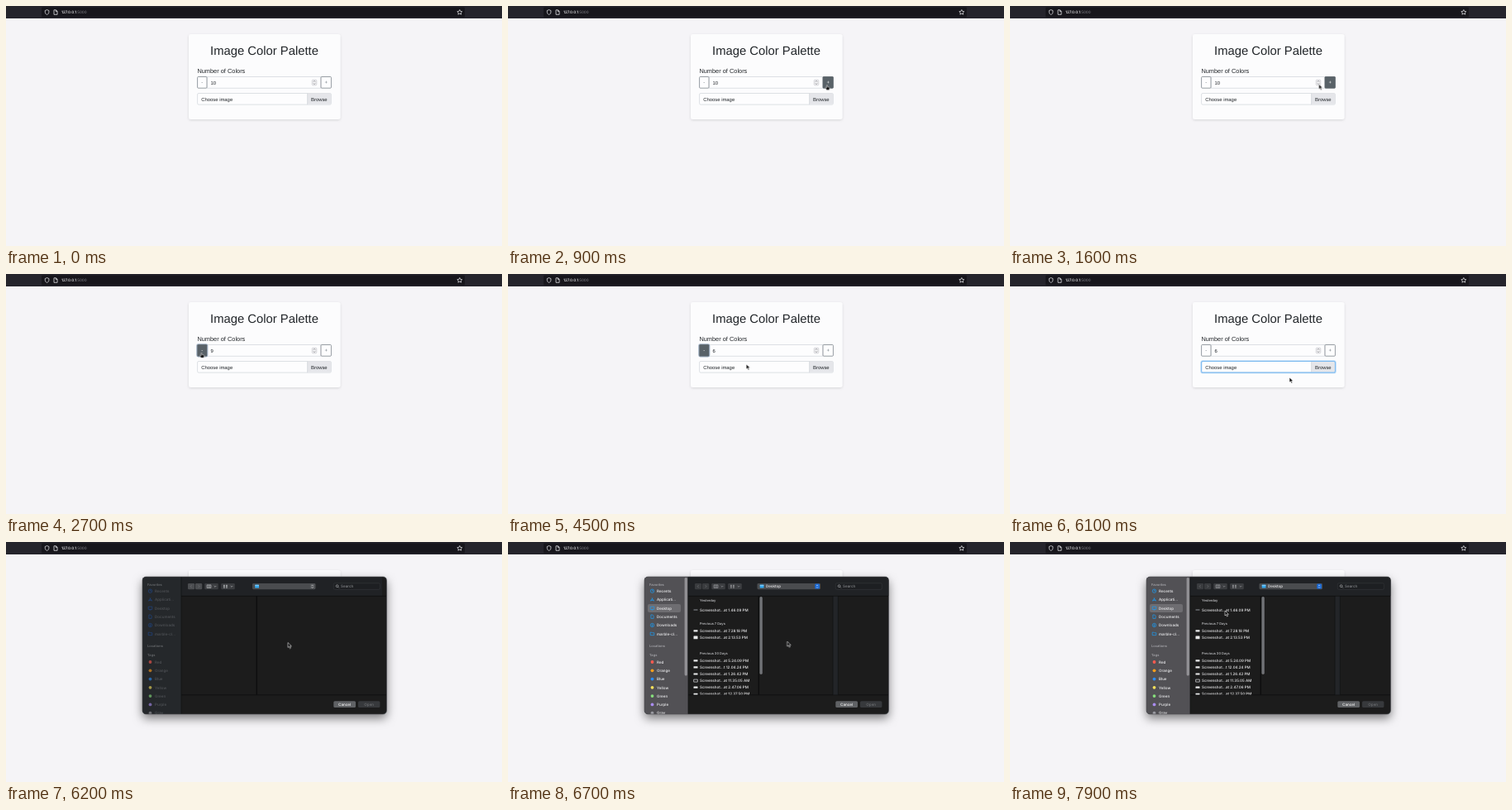
An HTML page for the animation above (8 s loop, 600 px wide and 290 px high).

```html
<!DOCTYPE html>
<html lang="en">
<head>
<meta charset="utf-8">
<title>Image Color Palette</title>
<style>
html, body { margin: 0; width: 100%; height: 100%; overflow: hidden; background: #f5f4f7; }
svg { display: block; width: 600px; height: 290px; }
text { text-rendering: geometricPrecision; }
.page text { font: 5.9px "Liberation Sans", Arial, sans-serif; fill: #212529; }
.page .title { font-size: 14.8px; }
.page .label { font-size: 7.4px; }
.page .light { fill: #fff; }
.ui { font: 500 4.55px Inter, sans-serif; }
.head { font: 600 4px Inter, sans-serif; }
.mid { text-anchor: middle; }

/* Hard switches share one 8 s clock */
.sw { animation: 8s step-end infinite; }
.plus { animation-name: plus; }
.minus { animation-name: minus; }
.minusRing { animation-name: minusRing; }
.fileRing { animation-name: fileRing; }
.n10 { animation-name: n10; }
.n9 { animation-name: n9; }
.n8 { animation-name: n8; }
.n7 { animation-name: n7; }
.n6 { animation-name: n6; }
.opening { animation-name: opening; }
.opened { animation-name: opened; }
.arrow { animation-name: arrow; }
.hand { animation-name: hand; }
.cursor { animation: move 8s linear infinite; }

@keyframes plus { 0% { opacity: 0 } 11.25% { opacity: 1 } 21.25% { opacity: 0 } }
@keyframes minus { 0% { opacity: 0 } 27.5% { opacity: 1 } 57.5% { opacity: 0 } }
@keyframes minusRing { 0% { opacity: 0 } 30% { opacity: 1 } 65% { opacity: 0 } }
@keyframes fileRing { 0% { opacity: 0 } 65% { opacity: .5 } 66.25% { opacity: 1 } }
@keyframes n10 { 0% { opacity: 1 } 30% { opacity: 0 } }
@keyframes n9 { 0% { opacity: 0 } 30% { opacity: 1 } 36.25% { opacity: 0 } }
@keyframes n8 { 0% { opacity: 0 } 36.25% { opacity: 1 } 38.75% { opacity: 0 } }
@keyframes n7 { 0% { opacity: 0 } 38.75% { opacity: 1 } 43.75% { opacity: 0 } }
@keyframes n6 { 0% { opacity: 0 } 43.75% { opacity: 1 } }
@keyframes opening { 0% { opacity: 0 } 77.5% { opacity: 1 } 78.75% { opacity: 0 } }
@keyframes opened { 0% { opacity: 0 } 78.75% { opacity: 1 } }
@keyframes arrow { 0% { opacity: 0 } 2.5% { opacity: 1 } 11.25% { opacity: 0 } 20% { opacity: 1 } 27.5% { opacity: 0 } 56.25% { opacity: 1 } }
@keyframes hand { 0% { opacity: 0 } 11.25% { opacity: 1 } 20% { opacity: 0 } 27.5% { opacity: 1 } 56.25% { opacity: 0 } }
@keyframes move {
  0%, 2.5% { transform: translate(345px, 218px); animation-timing-function: ease-out }
  12.5% { transform: translate(387px, 92px) }
  18.75% { transform: translate(386px, 93px) }
  20% { transform: translate(374px, 94.5px); animation-timing-function: ease-out }
  27.5%, 55% { transform: translate(236.5px, 95px) }
  56.25% { transform: translate(288px, 109px); animation-timing-function: ease-out }
  60%, 71.25% { transform: translate(337px, 111px) }
  76.25% { transform: translate(338px, 125px) }
  77.5%, 82.5% { transform: translate(341px, 121.5px); animation-timing-function: ease-in-out }
  91.25% { transform: translate(262px, 89px) }
  93.75%, 100% { transform: translate(260px, 83px) }
}
</style>
</head>
<body>
<svg viewBox="0 0 600 290">
  <defs>
    <filter id="cardShadow" x="-10%" y="-10%" width="120%" height="125%">
      <feDropShadow dx="0" dy="1" stdDeviation="1.6" flood-opacity=".13"/>
    </filter>
    <filter id="deepShadow" x="-15%" y="-15%" width="130%" height="140%">
      <feDropShadow dx="0" dy="5" stdDeviation="6" flood-opacity=".5"/>
    </filter>
    <clipPath id="frame"><rect x="165" y="42" width="295.5" height="166" rx="4.5"/></clipPath>
    <clipPath id="files"><rect x="218" y="66" width="86" height="118.5"/></clipPath>
  </defs>

  <rect width="600" height="290" fill="#f5f4f7"/>
  <rect width="600" height="15" fill="#25242c"/>
  <rect x="43" y="1.5" width="512" height="12" rx="1.5" fill="#17161c"/>
  <g fill="none" stroke="#dcdce0" stroke-width=".8" stroke-linejoin="round">
    <path d="M49.6 4.6l2.3.9v1.7c0 1.6-.9 2.6-2.3 3.3-1.4-.7-2.3-1.7-2.3-3.3V5.5z"/>
    <path d="M58 4.8h2.5l1.6 1.6v3.9H58zM60.4 4.9v1.7h1.6"/>
    <path d="M548.8 4.5l.9 1.9 2.1.3-1.5 1.4.4 2.1-1.9-1-1.9 1 .4-2.1-1.5-1.4 2.1-.3z"/>
  </g>
  <text class="ui" x="67" y="9.3" fill="#f5f5f7" style="font-size:4.6px">127.0.0.1<tspan fill="#85848c" font-weight="400">:5000</tspan></text>

  <g class="page">
    <rect x="221" y="34" width="183.5" height="103" rx="3" fill="#fcfcfd" filter="url(#cardShadow)"/>
    <text class="title mid" x="312.5" y="59">Image Color Palette</text>
    <text class="label" x="231.4" y="80.5">Number of Colors</text>

    <g fill="#fdfdfe" stroke-width=".7">
      <rect x="243" y="85.5" width="138" height="13.7" stroke="#d0d5da"/>
      <rect x="231.6" y="85.5" width="11.4" height="13.7" rx="1" stroke="#6c757d"/>
      <rect x="381" y="85.5" width="12.4" height="13.7" rx="1" stroke="#6c757d"/>
    </g>
    <text class="mid" x="237.3" y="94.3" style="fill:#6c757d">-</text>
    <text class="mid" x="387.2" y="94.4" style="fill:#6c757d">+</text>
    <g class="sw plus">
      <rect x="380.8" y="85.2" width="12.8" height="14.2" rx="1" fill="#596268"/>
      <text class="mid light" x="387.2" y="94.4">+</text>
    </g>
    <rect class="sw minusRing" x="230.9" y="84.8" width="12.8" height="15" rx="1.8" fill="none" stroke="#9fb0c4" stroke-width="1.3"/>
    <g class="sw minus">
      <rect x="231.4" y="85.2" width="11.8" height="14.2" rx="1" fill="#596268"/>
      <text class="mid light" x="237.3" y="94.3">-</text>
    </g>

    <text class="sw n10" x="247.5" y="94.5">10</text>
    <text class="sw n9" x="247.5" y="94.5">9</text>
    <text class="sw n8" x="247.5" y="94.5">8</text>
    <text class="sw n7" x="247.5" y="94.5">7</text>
    <text class="sw n6" x="247.5" y="94.5">6</text>

    <rect x="370.2" y="89.2" width="5.6" height="6.6" rx="1.2" fill="#f1f1f3" stroke="#b9b9be" stroke-width=".5"/>
    <path d="M371.8 91.6l1.2-1.2 1.2 1.2M371.8 93.4l1.2 1.2 1.2-1.2" fill="none" stroke="#55555a" stroke-width=".6"/>

    <rect x="231.6" y="105.5" width="161.8" height="13.6" rx="1.5" fill="#fdfdfe" stroke="#d0d5da" stroke-width=".7"/>
    <path d="M364.6 105.8h27.4q1.2 0 1.2 1.2v10.6q0 1.2-1.2 1.2h-27.4z" fill="#e5e6ea"/>
    <path d="M364.6 105.5v13.6" stroke="#d0d5da" stroke-width=".7"/>
    <text x="236.2" y="114.5">Choose image</text>
    <text x="369" y="114.5">Browse</text>
    <g class="sw fileRing" fill="none">
      <rect x="231.3" y="105.2" width="162.5" height="14.2" rx="2" stroke="#b9d9f7" stroke-width="1.8"/>
      <rect x="231.6" y="105.5" width="161.8" height="13.6" rx="1.5" stroke="#6db1ee" stroke-width=".8"/>
    </g>
  </g>

  <g class="sw opening" id="opening"></g>
  <g class="sw opened" id="opened"></g>

  <g class="cursor">
    <path class="sw arrow" d="M0 0v6l1.4-1.3 1 2.3 1.1-.5-1-2.2h1.9z" fill="#0b0b0c" stroke="#fff" stroke-width=".55" stroke-linejoin="round"/>
    <path class="sw hand" d="M-.6.5q.6-1 1.2 0v2l2 .5q.7.3.6 1L2.700 6.300h-3.200L-2.200 3.800q0-.8.800-.6l.800.700z" fill="#0b0b0c" stroke="#fff" stroke-width=".5" stroke-linejoin="round"/>
  </g>
</svg>

<script>
const rect = (x, y, w, h, fill, r = 0) =>
  `<rect x="${x}" y="${y}" width="${w}" height="${h}" rx="${r}" fill="${fill}"/>`;
const text = (x, y, str, fill, cls = 'ui') =>
  `<text class="${cls}" x="${x}" y="${y}" fill="${fill}">${str}</text>`;
const line = (d, color, w = .6) =>
  `<path d="${d}" fill="none" stroke="${color}" stroke-width="${w}"/>`;

const places = [
  ['Recents', 'M2.200 0a2.200 2.200 0 1 0-4.400 0a2.200 2.200 0 1 0 4.400 0M0-1.400V0h1.200'],
  ['Applicati…', 'M-1.800 2L.500-2M1.800 2L-.500-2M-2.200.800h4.400'],
  ['Desktop', 'M-2.300-1.700h4.600v3.200h-4.600zM-1 2.200h2'],
  ['Documents', 'M-1.600-2.200h2l1.200 1.200v3.200h-3.200z'],
  ['Downloads', 'M2.200 0a2.200 2.200 0 1 0-4.400 0a2.200 2.200 0 1 0 4.400 0M0-1.200V1M-.900.200L0 1.100.900.200'],
  ['marble-cl…', 'M-2.300-1.700h1.700l.600.600h2.300v2.900h-4.600z']
];
const tags = [
  ['Red', '#ff5a50'], ['Orange', '#ff9f1c'], ['Blue', '#2a8cf5'], ['Yellow', '#f5e05a'],
  ['Green', '#86e07c'], ['Purple', '#a98cf0'], ['Gray', '#9a9aa0']
];
const groups = [
  [71, 'Yesterday', 82, ['at 1.46.09 PM']],
  [99, 'Previous 7 Days', 107.3, ['at 7.28.18 PM', 'at 2.13.53 PM']],
  [135, 'Previous 30 Days', 143.3, ['at 5.24.09 PM', 't 12.04.24 PM', 'at 1.26.42 PM',
    'at 11.35.05 AM', 'at 2.47.06 PM', 'at 12.37.50 PM']]
];

function sidebar(early) {
  const ink = early ? '#505357' : '#f0f0f2';
  const head = early ? '#65686b' : '#a2a2a6';
  const blue = early ? '#204583' : '#1b9cf5';
  let s = rect(165, 42, early ? 47 : 53, 166, early ? '#25282b' : '#525155');
  if (!early) s += rect(169, 75, 40, 10, '#6e6d71', 2) + rect(213.6, 43, 3.3, 118.5, '#929195', 1.6);
  s += text(171, 52.5, 'Favorites', head, 'head')
    + text(171, 126.6, 'Locations', head, 'head')
    + text(171, 138, 'Tags', head, 'head');
  places.forEach(([name, icon], i) => {
    const y = 59.2 + i * 10.33;
    s += `<g transform="translate(174.500 ${y})">${line(icon, blue, .7)}</g>` + text(180, y + 1.7, name, ink);
  });
  tags.forEach(([name, color], i) => {
    const y = 145 + i * 10.28;
    s += `<circle cx="174.500" cy="${y}" r="1.900" fill="${color}" opacity="${early ? .6 : 1}"/>`
      + text(180, y + 1.7, name, ink);
  });
  return s;
}

function toolbar(early) {
  const dx = early ? -6 : 0, px = early ? -3.5 : 0;
  const mark = early ? '#c6c8ca' : '#a5a7aa';
  let s = `<g transform="translate(${dx} 0)">`
    + rect(226, 50, 8.2, 7.2, early ? '#4b4d50' : '#393b3e', 1.3)
    + rect(235, 50, 8.2, 7.2, early ? '#4b4d50' : '#393b3e', 1.3)
    + line('M230.700 52l-1.500 1.600 1.500 1.600M238.500 52l1.500 1.600-1.500 1.600', '#77797c');
  for (const x of [246.2, 266.2])
    s += rect(x, 50, 16.6, 7.2, '#3b3d40', 1.3) + line(`M${x + 11.5} 53l1.300 1.300 1.300-1.300`, mark);
  s += line('M249 51.900h5v3.500h-5zM250.700 52v3.400M252.400 52v3.400', mark)
    + line('M269 52.300h1.800M272 52.300h1.800M269 53.700h1.800M272 53.700h1.800M269 55.100h1.800M272 55.100h1.800', mark, .9)
    + `</g><g transform="translate(${px} 0)">`
    + rect(301.5, 50, 76.5, 7.2, '#4a4c4f', 1.4)
    + rect(304.7, 51.4, 4.8, 4.2, '#35aaf0', .6) + rect(304.7, 52.3, 4.8, .6, '#b9e2fb')
    + rect(371.3, 50.6, 5.6, 6, early ? '#55575a' : '#1769d8', 1.2)
    + line('M373 53l1.100-1.100 1.100 1.100M373 54.300l1.100 1.100 1.100-1.100', '#f2f2f4')
    + (early ? '' : text(312, 55.3, 'Desktop', '#f0f0f2')) + '</g>';
  return s + `<rect x="396.300" y="49.800" width="56" height="7.600" rx="1.500" fill="#1d1f22" stroke="#3b3d40" stroke-width=".5"/>`
    + `<circle cx="400.600" cy="53.200" r="1.400" fill="none" stroke="#c5c6c8" stroke-width=".6"/>`
    + line('M401.700 54.300l1.200 1.200', '#c5c6c8') + text(405, 55.3, 'Search', '#85878a');
}

function fileList() {
  let s = '<g clip-path="url(#files)">', row = 0;
  for (const [hy, title, top, names] of groups) {
    s += text(232, hy + 1.4, title, '#b4b5b8', 'head');
    names.forEach((name, i) => {
      const y = top + i * 8.1, big = row === 2;
      if (row === 6) s += line(`M224.700 ${y - 1.5}h4.600v3h-4.600z`, '#dfe0e2', .7);
      else s += rect(224.5, y - (big ? 1.8 : 1.1), 5, big ? 3.6 : 2.2, row ? '#e8e9ea' : '#55575a', .3);
      s += text(232, y + 1.6, 'Screenshot…' + name, '#ececee');
      row++;
    });
  }
  return s + '</g>' + rect(304.4, 66, 3.4, 94, '#707276', 1.7);
}

function dialog(early) {
  const left = early ? 212 : 218;
  return rect(165, 42, 295.5, 166, '#1a1b1e', 4.5).replace('/>', ' filter="url(#deepShadow)"/>')
    + '<g clip-path="url(#frame)">' + sidebar(early)
    + rect(left, 42, 243, 23, '#202225')
    + line(`M${left} 65.300H460M${left} 184.800H460`, '#0d0e10', .8)
    + line(`M${left} 42V208`, '#111214', .7)
    + line('M303.200 65.500V184.500', '#08090a', 1)
    + (early ? '' : rect(393.2, 65.7, 6, 118.8, '#232528') + line('M393 65.500V184.500M399.300 65.500V184.500', '#101113'))
    + toolbar(early)
    + (early ? '' : fileList())
    + rect(396.3, 192.3, 26.7, 7.6, '#606265', 1.5) + text(409.6, 197.7, 'Cancel', '#fff', 'ui mid')
    + rect(426, 192.3, 26.4, 7.6, '#37393c', 1.5) + text(439.2, 197.7, 'Open', '#707275', 'ui mid')
    + '</g><rect x="165" y="42" width="295.500" height="166" rx="4.500" fill="none" stroke="#4a4c50" stroke-width=".6"/>';
}

document.getElementById('opening').innerHTML = dialog(true);
document.getElementById('opened').innerHTML = dialog(false);
</script>
</body>
</html>
```
